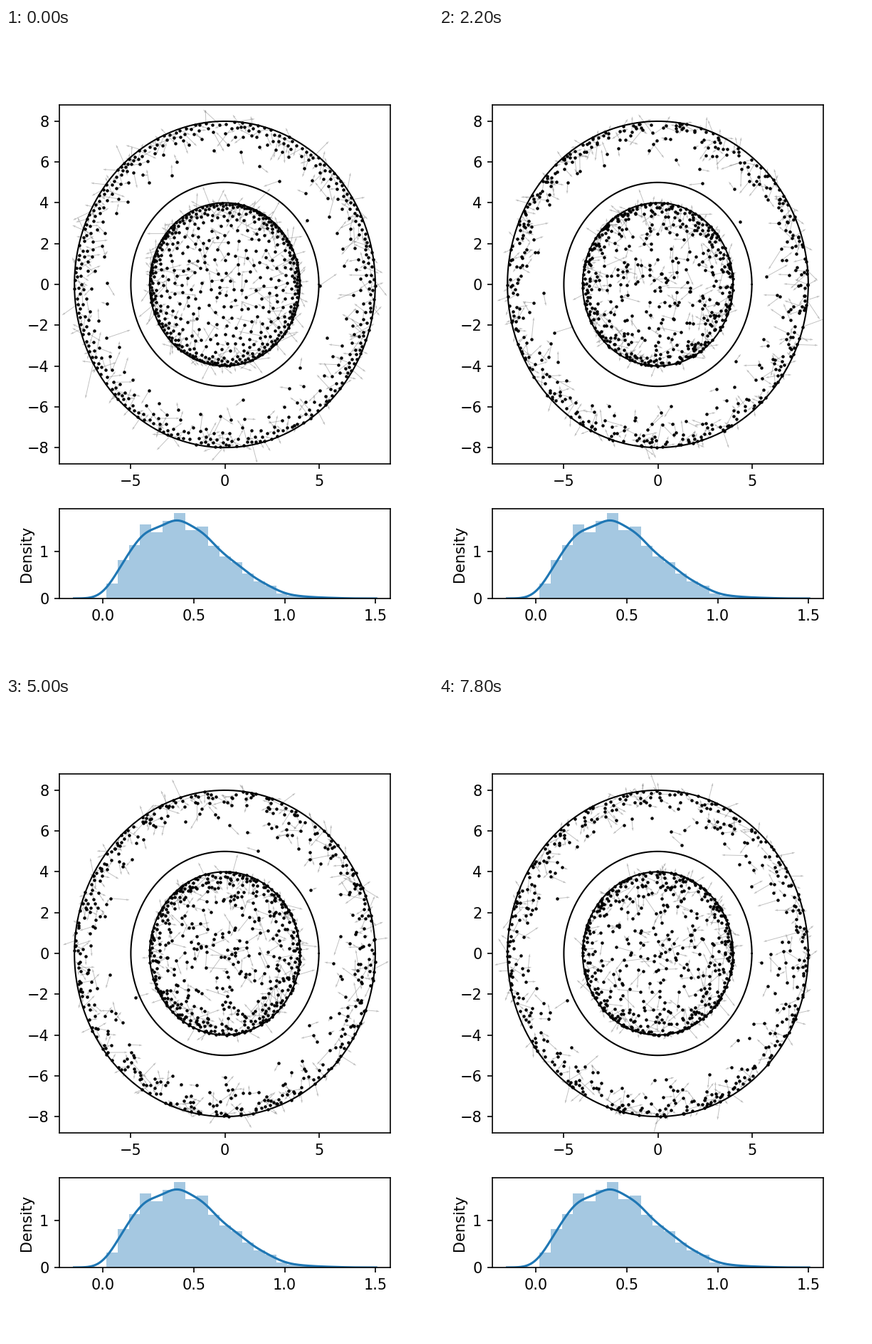
Write a matplotlib script that moves like this. It is 600 px wide and 900 px high and loops after 8000 ms.

```python
import numpy as np
import matplotlib.pyplot as plt
from matplotlib.animation import FuncAnimation

FRAMES, INTERVAL = 40, 200
DT = 0.1                    # simulated time per frame
SIGMA = 0.3                 # thermal speed per axis
REACH, PUSH = 0.26, 1.0     # range and strength of the mutual repulsion
R_IN, R_GAP, R_OUT = 4, 5, 8

rng = np.random.default_rng(12)


class Region:
    """Particles between two circular walls, drawn to the outer one."""

    def __init__(self, n, lo, hi, pull, power):
        self.lo, self.hi, self.pull, self.power = lo, hi, pull, power
        self.x = self.place(n)
        self.v = rng.normal(0, SIGMA, (n, 2))

    def place(self, n):
        """Thermal radii; each angle is the emptiest of some random ones."""
        r = np.linspace(self.lo, self.hi, 2000)
        k = self.pull * self.hi / ((self.power + 1) * SIGMA ** 2)
        cdf = np.cumsum(r * np.exp(k * (r / self.hi) ** (self.power + 1)))
        radii = np.interp(rng.random(n), cdf / cdf[-1], r)
        pts = np.full((n, 2), 99.0)
        for i, radius in enumerate(radii):
            t = rng.random(25) * 2 * np.pi
            trial = radius * np.column_stack((np.cos(t), np.sin(t)))
            gap = ((trial[:, None] - pts) ** 2).sum(2).min(1)
            pts[i] = trial[gap.argmax()]
        return pts

    def force(self):
        r = np.hypot(*self.x.T)[:, None]
        d = self.x[:, None] - self.x
        dist = np.hypot(d[..., 0], d[..., 1]) + 1e-9
        near = np.clip(1 - dist / REACH, 0, None) / dist
        field = self.pull * (r / self.hi) ** self.power * self.x / r
        return field + PUSH * (near[..., None] * d).sum(1)

    def bounce(self, wall, sign):
        r = np.hypot(*self.x.T)[:, None]
        n = self.x / r
        vr = (self.v * n).sum(1, keepdims=True)
        hit = sign * (r - wall) > 0
        self.x = np.where(hit, n * wall, self.x)
        self.v -= np.where(hit & (sign * vr > 0), 2 * vr * n, 0)

    def step(self):
        self.v += self.force() * DT
        self.x = self.x + self.v * DT
        self.bounce(self.hi, 1)
        self.bounce(self.lo, -1)


def simulate():
    regions = (Region(490, 0, R_IN, 0.5, 7),
               Region(450, R_GAP, R_OUT, 0.2, 1))
    states = []
    for _ in range(FRAMES):
        states.append((np.vstack([g.x for g in regions]),
                       np.vstack([g.v for g in regions])))
        for g in regions:
            g.step()
    return states


STATES = simulate()

fig, (ax, hist) = plt.subplots(
    2, 1, figsize=(4, 6), dpi=150, gridspec_kw={"height_ratios": [4, 1]})

# Particles
ax.set(xlim=(-8.8, 8.8), ylim=(-8.8, 8.8),
       xticks=(-5, 0, 5), yticks=range(-8, 9, 2))
theta = np.linspace(0, 2 * np.pi, 200)
for radius in (R_IN, R_GAP, R_OUT):
    ax.plot(radius * np.cos(theta), radius * np.sin(theta), "k", lw=1)
x0, v0 = STATES[0]
arrows = ax.quiver(*x0.T, *v0.T, color="gray", alpha=0.5,
                   scale=11, width=0.002)
dots, = ax.plot(*x0.T, "k.", ms=2.3)

# Speed distribution: bar heights, then a geometric tail
bars = [.32, .82, 1.14, 1.58, 1.42, 1.66, 1.83, 1.46,
        1.54, 1.13, .90, .78, .53, .37, .27]
density = np.append(bars, 0.1 * 0.63 ** np.arange(6))
edges = np.linspace(0.017, 1.327, len(density) + 1)
width = edges[1] - edges[0]
hist.bar(edges[:-1], density, width, align="edge",
         color="C0", alpha=0.4, linewidth=0)
BW = 0.059
s = np.linspace(-0.16, 1.504, 200)
z = (s[:, None] - edges[:-1] - width / 2) / BW
kernel = np.exp(-z ** 2 / 2) / (BW * np.sqrt(2 * np.pi))
hist.plot(s, kernel @ density * width, "C0", lw=1.5)
hist.set(xlim=(-0.2405, 1.5815), ylim=(0, 1.922),
         xticks=(0, 0.5, 1, 1.5), yticks=(0, 1), ylabel="Density")


def draw(i):
    x, v = STATES[i]
    dots.set_data(*x.T)
    arrows.set_offsets(x)
    arrows.set_UVC(*v.T)
    return arrows, dots


anim = FuncAnimation(fig, draw, frames=FRAMES, init_func=lambda: draw(0),
                     interval=INTERVAL, repeat=True, repeat_delay=0)
plt.show()
```
